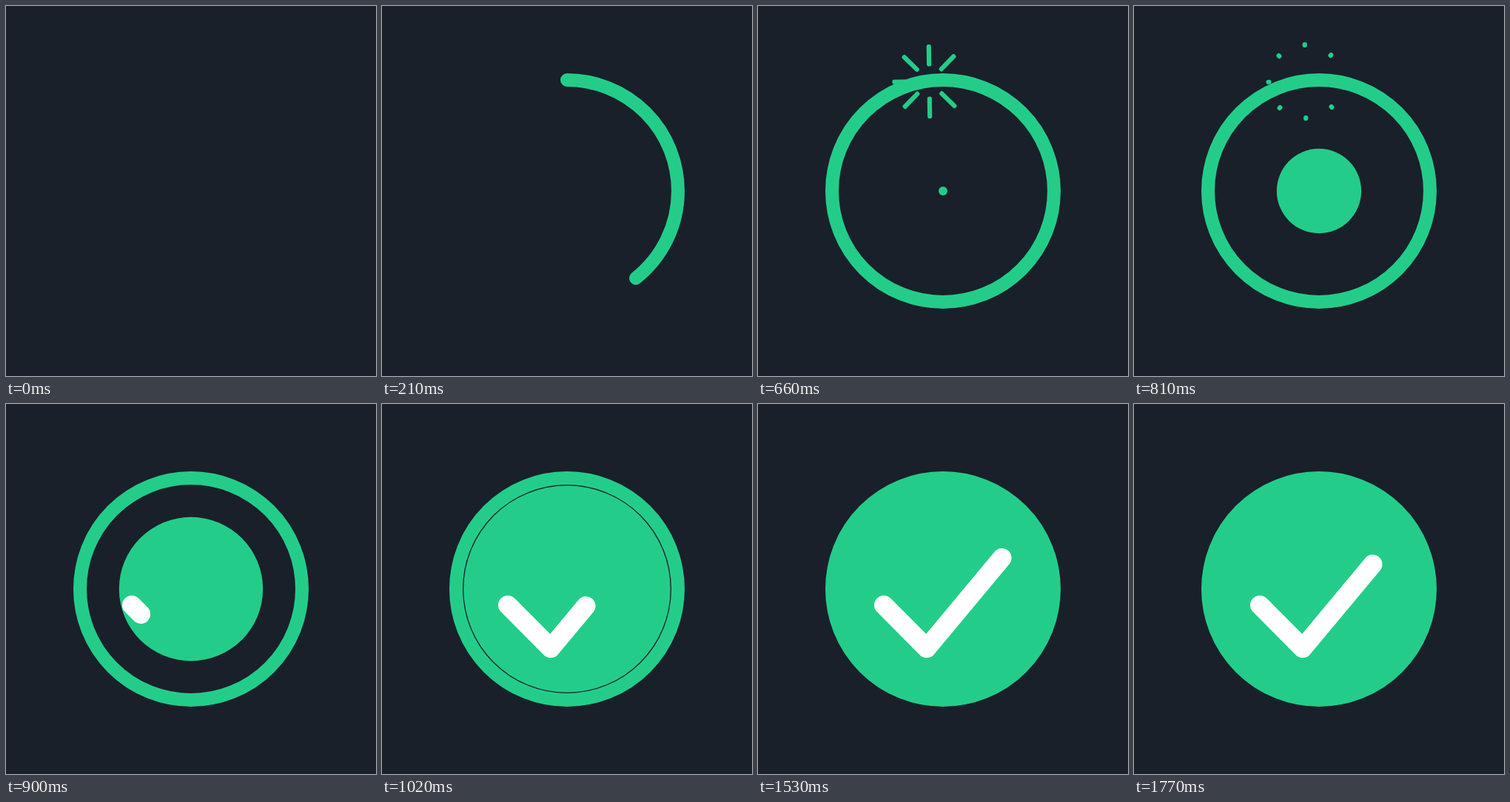
These frames come from a looping animation (500 px wide and 500 px high, 2760 ms). An HTML page with a canvas:

```html
<!DOCTYPE html>
<html lang="en">
<head>
<meta charset="utf-8">
<title>Success check</title>
<style>
html, body { margin: 0; width: 100%; height: 100%; overflow: hidden; background: #19202a; }
canvas { display: block; width: 500px; height: 500px; }
</style>
</head>
<body>
<canvas id="stage" width="500" height="500"></canvas>
<script>
const ctx = document.getElementById('stage').getContext('2d');
const LOOP = 2760, STEP = 30;
const BG = '#19202a', GREEN = '#23cd89', WHITE = '#ffffff';
const CENTER = 250, RADIUS = 150;

// Eased progress from 0 to 1 between two times
function ease(t, from, to) {
  const u = Math.min(1, Math.max(0, (t - from) / (to - from)));
  return u * u * (3 - 2 * u);
}

function stroke(color, width) {
  ctx.strokeStyle = color;
  ctx.lineWidth = width;
  ctx.lineCap = ctx.lineJoin = 'round';
  ctx.stroke();
}

function drawRing(t) {
  const p = ease(t, 0, 490);
  if (p <= 0) return;
  ctx.beginPath();
  ctx.arc(CENTER, CENTER, RADIUS, -Math.PI / 2, -Math.PI / 2 + p * 2 * Math.PI);
  stroke(GREEN, 18);
}

function drawBurst(t) {
  const start = 22 + 28 * ease(t, 633, 833);
  const end = 22 + 28 * ease(t, 500, 700);
  if (end - start < 0.05) return;
  ctx.save();
  ctx.translate(231.5, 102);
  ctx.rotate(-0.015);
  ctx.fillStyle = GREEN;
  for (let i = 0; i < 8; i++) {
    ctx.beginPath();
    ctx.roundRect(start - 3, -3.1, end - start + 6, 6.2, 2.4);
    ctx.fill();
    ctx.rotate(Math.PI / 4);
  }
  ctx.restore();
}

function drawDisc(t) {
  const r = RADIUS * ease(t, 600, 1100);
  if (r <= 0) return;
  ctx.beginPath();
  ctx.arc(CENTER, CENTER, r, 0, 2 * Math.PI);
  ctx.fillStyle = GREEN;
  ctx.fill();
}

function drawCheck(t) {
  const len = 264.5 * ease(t, 854, 1150) - 34.8 * ease(t, 1150, 1760);
  if (len <= 0) return;
  const short = 82;
  const a = Math.min(len, short), b = len - a;
  ctx.beginPath();
  ctx.moveTo(170, 271.7);
  ctx.lineTo(170 + 58 * a / short, 271.7 + 58.3 * a / short);
  if (b > 0) ctx.lineTo(228 + 0.64 * b, 330 - 0.768 * b);
  stroke(WHITE, 26);
}

function draw(now) {
  const t = Math.floor(now % LOOP / STEP) * STEP;
  ctx.fillStyle = BG;
  ctx.fillRect(0, 0, 500, 500);
  drawRing(t);
  drawBurst(t);
  drawDisc(t);
  drawCheck(t);
}

let begin = null;
function tick(now) {
  if (begin === null) begin = now;
  draw(Math.max(0, now - begin));
  requestAnimationFrame(tick);
}
draw(0);
requestAnimationFrame(tick);
</script>
</body>
</html>
```
